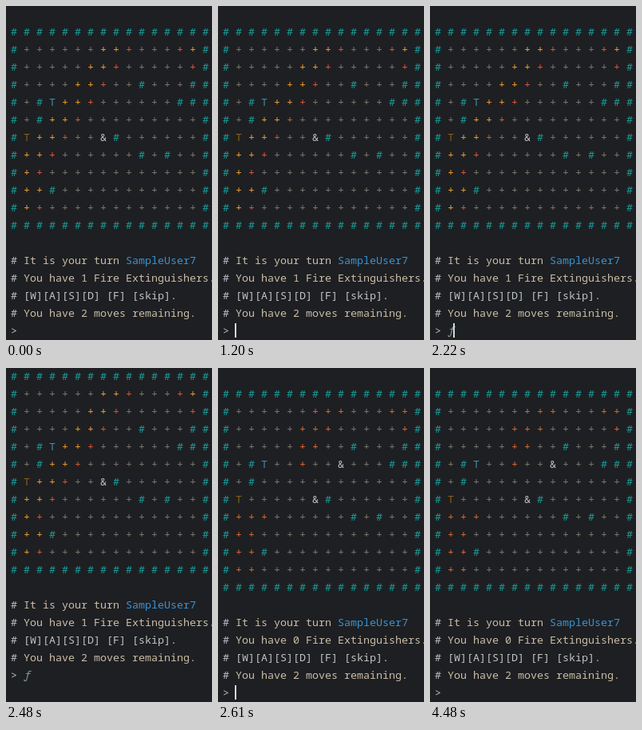
Write an HTML page that moves like this. It is 258x418 px and loops after 4940 ms.

```html
<!DOCTYPE html>
<html lang="en">
<head>
<meta charset="utf-8">
<title>Fire game terminal</title>
<style>
html, body { margin: 0; width: 100%; height: 100%; overflow: hidden; background: #1e1f22; }
body { position: relative; }
#log {
  position: absolute; left: 6px; top: -1px; margin: 0;
  font: 13.3333px/22px "Noto Sans Mono", "DejaVu Sans Mono", monospace;
  color: #cbbda8; white-space: pre; font-variant-ligatures: none;
}
#log div { height: 22px; }
.wall { color: #1b9c9a; }
.floor { color: #7b796e; }
.mild { color: #f0a02e; }
.hot { color: #e5533a; }
.after .mild, .after .hot { color: #de6a34; }
.blue { color: #3a8fae; }
.brown { color: #86601f; }
.pale { color: #bcbec4; }
.keys { color: #bfc6c2; }
.name { color: #3993d4; }
#typed { color: #7f9c80; font-style: italic; }
#caret { position: absolute; top: 397px; width: 2px; height: 18px; background: #d4d6da; }
</style>
</head>
<body>
<div id="log"></div>
<div id="caret"></div>
<script>
const $ = id => document.getElementById(id);
const LOOP = 4940, LINE = 22;

// . floor, y mild fire, r hot fire, T and t towers, & firefighters
const before = [
  "......yyr...ry", ".....yyr.....r", "....yyr..#...#", ".#Tyyr......##", ".#yyr.........",
  "tyyr..&#......", "yyr......#.#..", "yr............", "yy#...........", "yr............"];
const after = [
  "......yyr...ry", ".....yyr.....r", ".....rr..#...#", ".#T..r..&...##", ".#............",
  "t.....&#......", "yyr......#.#..", "yr............", "yy#...........", "yr............"];

const cells = {
  "#": ["wall", "#"], ".": ["floor", "+"], y: ["mild", "+"], r: ["hot", "+"],
  T: ["blue", "T"], t: ["brown", "T"], "&": ["pale", "&amp;"]
};
const span = (cls, text) => `<span class="${cls}">${text}</span>`;
const row = text => `<div>${text}</div>`;
const mapRow = s => row([...s].map(c => span(...cells[c])).join(" "));
const note = text => row(span("pale", "#") + " " + text);

function turn(cls, map, extinguishers, input) {
  const edge = "#".repeat(16);
  return `<section class="${cls}">` + row("") +
    [edge, ...map.map(s => `#${s}#`), edge].map(mapRow).join("") + row("") +
    note("It is your turn " + span("name", "SampleUser7")) +
    note(`You have ${extinguishers} Fire Extinguishers.`) +
    note(span("keys", "[W][A][S][D] [F] [skip].")) +
    note("You have 2 moves remaining.") +
    row(span("pale", "&gt;") + " " + input) + "</section>";
}

$("log").innerHTML =
  turn("before", before, 1, '<span id="typed">ƒ</span>') + turn("after", after, 0, "");

const within = (t, a, b) => t >= a && t < b;
const caretOn = [[950, 1470], [1940, 2480], [2610, 3470], [4020, 4480]];

function frame() {
  const t = performance.now() % LOOP;
  const scroll = t < 2480 ? 0 : t < 2550 ? LINE : t < 2610 ? 337 : 19 * LINE;
  $("log").style.transform = `translateY(${-scroll}px)`;
  $("typed").style.visibility = t >= 2220 ? "visible" : "hidden";
  $("caret").style.left = (within(t, 2220, 2480) ? 29 : 21) + "px";
  $("caret").style.visibility = caretOn.some(([a, b]) => within(t, a, b)) ? "visible" : "hidden";
  requestAnimationFrame(frame);
}
frame();
</script>
</body>
</html>
```
